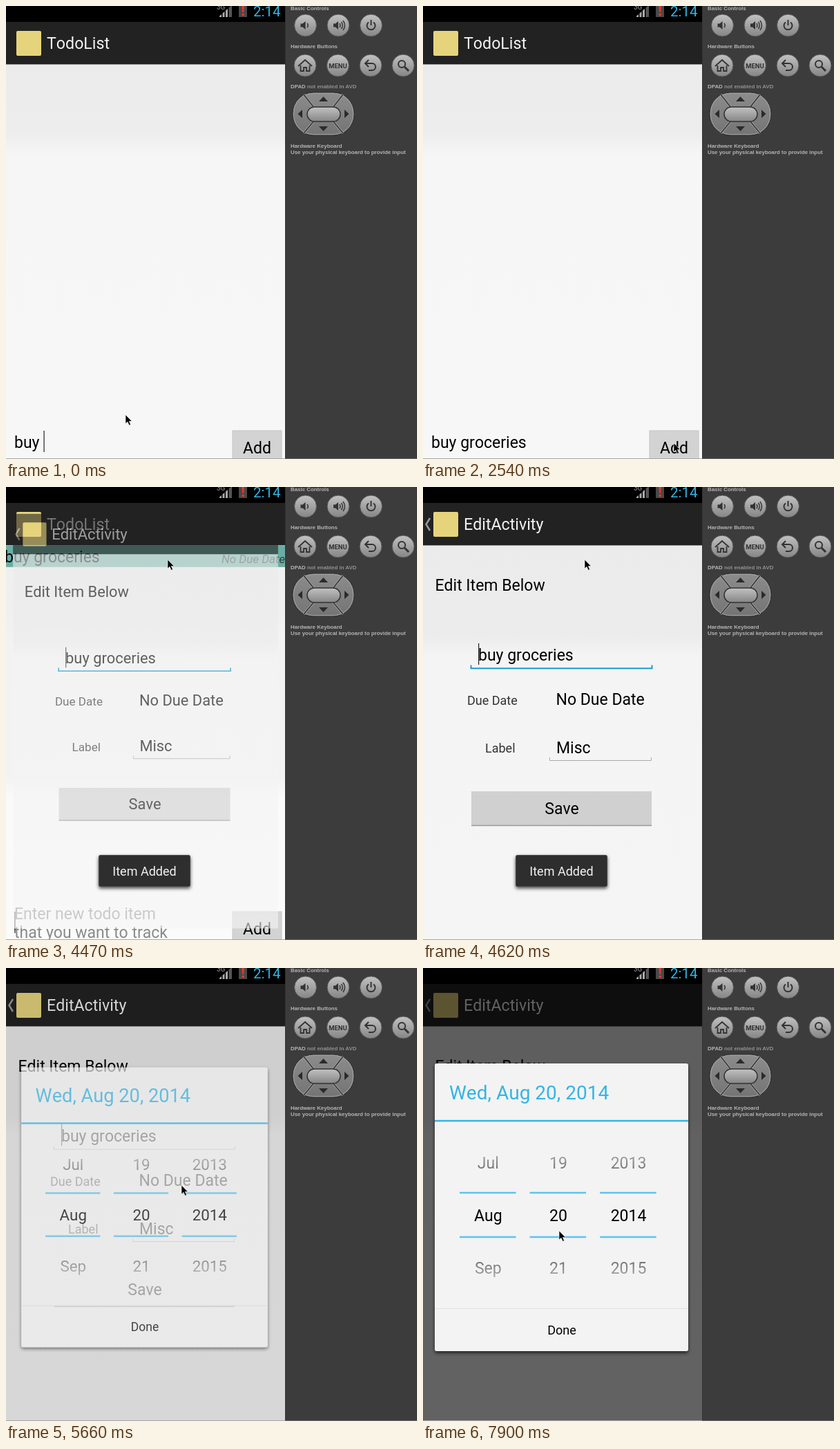
An HTML page for the animation above (8000 ms loop, 595 px wide and 655 px high).

```html
<!DOCTYPE html>
<html lang="en">
<head>
<meta charset="utf-8">
<title>Todo list demo</title>
<style>
  html, body { margin: 0; width: 100%; height: 100%; overflow: hidden; background: #3c3c3c; }
  svg { display: block; width: 595px; height: 655px; }
  text { font: 23px Roboto, sans-serif; font-kerning: none; white-space: pre; }
  .mid { text-anchor: middle; }
  .small { font-size: 18px; }
  .title { font-size: 23.2px; fill: #f3f3f3; }
  .note { font: bold 7.9px "Liberation Sans", Arial, sans-serif; fill: #b4b4b4; }
</style>
</head>
<body>
<svg viewBox="0 0 595 655">
  <defs>
    <linearGradient id="emptyBg" gradientUnits="userSpaceOnUse" x1="0" y1="84" x2="0" y2="654">
      <stop offset="0" stop-color="#ebebeb"/><stop offset=".175" stop-color="#ededed"/>
      <stop offset=".23" stop-color="#f6f6f6"/><stop offset="1" stop-color="#f7f7f7"/>
    </linearGradient>
    <linearGradient id="filledBg" gradientUnits="userSpaceOnUse" x1="0" y1="84" x2="0" y2="654">
      <stop offset="0" stop-color="#efefef"/><stop offset=".18" stop-color="#f0f0f0"/>
      <stop offset=".22" stop-color="#f2f2f2"/><stop offset=".59" stop-color="#f3f3f3"/>
      <stop offset=".64" stop-color="#fafafa"/><stop offset="1" stop-color="#fbfbfb"/>
    </linearGradient>
    <linearGradient id="editBg" gradientUnits="userSpaceOnUse" x1="0" y1="84" x2="0" y2="654">
      <stop offset="0" stop-color="#ebebeb"/><stop offset=".23" stop-color="#ececec"/>
      <stop offset=".28" stop-color="#f4f4f4"/><stop offset="1" stop-color="#f5f5f5"/>
    </linearGradient>
    <linearGradient id="knob" x1="0" y1="0" x2="0" y2="1">
      <stop offset="0" stop-color="#c2c2c2"/><stop offset="1" stop-color="#858585"/>
    </linearGradient>
    <linearGradient id="pad" x1="0" y1="0" x2="0" y2="1">
      <stop offset="0" stop-color="#8c8c8c"/><stop offset="1" stop-color="#747474"/>
    </linearGradient>
    <linearGradient id="upper" gradientUnits="userSpaceOnUse" x1="0" y1="270" x2="0" y2="294">
      <stop offset="0" stop-color="#a8a8a8"/><stop offset="1" stop-color="#6c6c6c"/>
    </linearGradient>
    <linearGradient id="lower" gradientUnits="userSpaceOnUse" x1="0" y1="422" x2="0" y2="446">
      <stop offset="0" stop-color="#6c6c6c"/><stop offset="1" stop-color="#a8a8a8"/>
    </linearGradient>
    <filter id="shadow" x="-10%" y="-20%" width="120%" height="150%">
      <feDropShadow dx="0" dy="2.500" stdDeviation="2.500" flood-opacity=".7"/>
    </filter>
    <clipPath id="screen"><rect width="404" height="654"/></clipPath>
    <g id="bar">
      <rect y="23" width="404" height="61.400" fill="#222"/>
      <rect x="15" y="36" width="36" height="36" rx="2" fill="#e6d47c"/>
    </g>
  </defs>

  <g clip-path="url(#screen)">
    <g id="list">
      <rect id="listBg" y="84" width="404" height="570"/>
      <use href="#bar"/>
      <text class="title" x="59" y="62">TodoList</text>
      <g id="item">
        <rect y="84" width="404" height="32" fill="#6bada4"/>
        <path d="M0 84.500H404M0 115.500H404" stroke="#85bdb5"/>
        <text x="-2" y="109">buy groceries</text>
        <text x="312" y="110" fill="#2c3c3a" style="font-size:17px;font-style:italic">No Due Date</text>
      </g>
      <text id="entry" x="12" y="639"></text>
      <g id="hint" fill="#8a8a8a">
        <text x="12" y="625">Enter new todo item</text>
        <text x="12" y="652">that you want to track</text>
      </g>
      <rect id="caret" y="614" width="1.200" height="31" fill="#222"/>
      <rect x="328" y="614" width="71" height="46" fill="#d3d3d3" stroke="#c6c6c6"/>
      <text class="mid" x="363.500" y="647">Add</text>
    </g>

    <g id="edit">
      <rect y="84" width="404" height="570" fill="url(#editBg)"/>
      <use href="#bar"/>
      <path d="M10 45L4.500 54L10 63" fill="none" stroke="#9a9a9a" stroke-width="2.500"/>
      <text class="title" x="59" y="62">EditActivity</text>
      <text x="17.500" y="150">Edit Item Below</text>
      <rect x="80" y="226" width="1.200" height="31" fill="#222"/>
      <text x="80" y="251">buy groceries</text>
      <path id="field" d="M69.500 257.500V262.200H331.500V257.500" fill="none"/>
      <text class="small" x="64" y="315" fill="#333">Due Date</text>
      <text x="192.500" y="315">No Due Date</text>
      <text class="small" x="90" y="384" fill="#333">Label</text>
      <text x="193" y="384.500">Misc</text>
      <path d="M183.500 391V395.500H330.500V391" fill="none" stroke="#aaa"/>
      <rect id="save" x="70" y="440" width="261" height="50" fill="#d0d0d0"/>
      <path d="M70 489.500H331" stroke="#999" stroke-width="1.500"/>
      <text class="mid" x="201" y="473">Save</text>
    </g>

    <g id="toast">
      <rect x="134.500" y="532.500" width="132" height="45" rx="2" fill="#2d2d2d" stroke="#484848" filter="url(#shadow)"/>
      <text class="small mid" x="200.500" y="562" fill="#f2f2f2">Item Added</text>
    </g>

    <rect id="dim" y="23" width="404" height="631"/>
    <g id="dialog">
      <rect x="17" y="138" width="367" height="416" rx="3" fill="#f3f3f3" filter="url(#shadow)"/>
      <text x="38" y="190" fill="#33b5e5" style="font-size:28px">Wed, Aug 20, 2014</text>
      <path d="M17 221H384" stroke="#33b5e5" stroke-width="2.600"/>
      <g id="wheels"></g>
      <path d="M17 492.500H384" stroke="#e1e1e1"/>
      <text class="small mid" x="201" y="530">Done</text>
    </g>
  </g>

  <rect width="404" height="23"/>
  <text x="305" y="5" fill="#999" style="font-size:10px">3G</text>
  <path d="M309 16V14.500L312 12V16zM313.500 16V10.500L316.500 8V16zM318 16V6.500L321 4V16z" fill="#aaa"/>
  <path d="M322.500 16V2.500L327 -1V16z" fill="#555"/>
  <rect x="337" y="-2" width="12" height="18" fill="#494949"/>
  <path d="M341.500 -1H344.800L344.200 9H342.100zM341.700 11H344.700V14H341.700z" fill="#f0352b"/>
  <text x="358" y="14.800" fill="#33b5e5" style="font-size:20.500px">2:14</text>

  <rect x="404" width="191" height="655" fill="#3c3c3c"/>
  <path d="M404.500 0V655" stroke="#343434"/>
  <path d="M0 654.500H404" stroke="#a6a6a6"/>
  <path d="M404 654.500H595" stroke="#666"/>
  <text class="note" x="412" y="6">Basic Controls</text>
  <text class="note" x="412" y="60.500">Hardware Buttons</text>
  <text class="note" x="412" y="118.500">DPAD <tspan fill="#919191">not enabled in AVD</tspan></text>
  <text class="note" x="412" y="204.500">Hardware Keyboard</text>
  <text class="note" x="412" y="214">Use your physical keyboard to provide input</text>
  <g id="knobs"></g>

  <g>
    <rect x="415" y="125" width="89" height="62" rx="30" fill="url(#pad)" stroke="#2c2c2c"/>
    <rect x="416.300" y="126.300" width="86.400" height="59.400" rx="29" fill="none" stroke="#a4a4a4"/>
    <path d="M431 128L446 147M488 128L473 147M431 184L446 166M488 184L473 166" stroke="#a4a4a4" stroke-width="3.500"/>
    <path d="M431 128L446 147M488 128L473 147M431 184L446 166M488 184L473 166" stroke="#3a3a3a" stroke-width="1.800"/>
    <rect x="436" y="146" width="48" height="21" rx="10.500" fill="url(#knob)" stroke="#333" stroke-width="1.500"/>
    <path d="M453 138L459.500 131L466 138zM453 174L459.500 181L466 174zM429 150L422.500 156L429 162zM490 150L496.500 156L490 162z" fill="#2b2b2b"/>
  </g>

  <path id="mouse" d="M0 0V13L3 10.300L5.300 15.300L7.500 14.300L5.300 9.500H9.300z" stroke="#fff" stroke-width=".6"/>
</svg>

<script>
  const LOOP = 8000;
  const $ = id => document.getElementById(id);
  const [listBg, item, entry, hint, caret, edit, field, save, toast, dim, dialog, mouse] =
    ['listBg', 'item', 'entry', 'hint', 'caret', 'edit', 'field', 'save', 'toast', 'dim', 'dialog', 'mouse'].map($);

  // Date picker columns
  const columns = [['Jul', 'Aug', 'Sep'], ['19', '20', '21'], ['2013', '2014', '2015']];
  const rowFill = ['url(#upper)', '#000', 'url(#lower)'];
  $('wheels').innerHTML = columns.map((rows, c) => {
    const x = 94.3 + c * 101.6;
    const labels = rows.map((s, r) =>
      `<text class="mid" x="${x}" y="${290 + r * 76}" fill="${rowFill[r]}">${s}</text>`).join('');
    return labels + `<path d="M${x - 41.3} 325h81.500m-81.500 64h81.500" stroke="#5cc3ee" stroke-width="2.500"/>`;
  }).join('');

  // Device buttons, icons drawn around their centre
  const speaker = 'M-7 -2.500H-4L0 -6V6L-4 2.500H-7z';
  const line = (d, w = 2) => `<path d="${d}" fill="none" stroke="#333" stroke-width="${w}"/>`;
  const solid = d => `<path d="${d}" fill="#333"/>`;
  const buttons = [
    [433.5, 28, solid(speaker) + line('M2.500 -3Q5 0 2.500 3', 1.5)],
    [481, 28, solid(speaker) + line('M2 -3Q4 0 2 3M4.500 -5Q8 0 4.500 5M7 -7Q12 0 7 7', 1.4)],
    [528.5, 28, line('M-3.500 -4.500A6 6 0 1 0 3.500 -4.500M0 -8V0')],
    [433, 86, line('M-10 1L0 -8L10 1M-6.500 0V8H-2V3H2V8H6.500V0', 1.8)],
    [480.5, 86, '<text class="mid" y="3.500" fill="#333" style="font-size:9.500px;font-weight:700">MENU</text>'],
    [528, 86, line('M-7 -3H2A5 5 0 0 1 2 7H-3M-3 -8L-8 -3L-3 2')],
    [575, 86, '<circle cx="-2" cy="-2" r="5" fill="none" stroke="#333" stroke-width="2"/>' + line('M2 2L8 8', 3)]
  ];
  $('knobs').innerHTML = buttons.map(([x, y, icon]) =>
    `<g transform="translate(${x} ${y})"><circle r="16" fill="url(#knob)" stroke="#555"/>${icon}</g>`).join('');

  // Rows are [start time, value...]; each holds until the next
  const typing = [[0, 4], [150, 5], [450, 7], [750, 8], [900, 9], [1350, 10], [1500, 11], [1650, 12], [1800, 13], [2840, 0]];
  const pointer = [
    [0, 173, 591], [2090, 288, 604], [2240, 312, 626], [2390, 342, 635], [2540, 363, 632],
    [3280, 360, 525], [3430, 350, 190], [3580, 272, 60], [3730, 242, 92], [3870, 234, 105],
    [4920, 238, 145], [5070, 246, 225], [5220, 252, 290], [5360, 254, 314],
    [5960, 250, 335], [6110, 235, 375], [6250, 213, 410], [6400, 200, 426],
    [6700, 188, 413], [6850, 212, 270], [7000, 224, 167],
    [7300, 223, 192], [7450, 221, 238], [7600, 216, 292], [7750, 206, 345], [7900, 197, 380]
  ];
  const toastAlpha = [[0, 0], [2990, .5], [3140, 1], [5070, .7], [5220, .35], [5360, 0]];
  const editPose = [[0, 0, 1], [4470, .6, .95], [4620, 1, 1]];
  const dialogPose = [[0, 0, 1], [5660, .68, .972], [5810, 1, 1]];
  const dimAlpha = [[0, 0], [5660, .12], [5810, .4], [5960, .6]];

  const at = (table, t) => table.findLast(row => row[0] <= t).slice(1);
  const show = (el, on) => { el.style.display = on ? '' : 'none'; };
  const fade = (el, a) => { show(el, a > 0); el.setAttribute('opacity', a); };
  function pose(el, [alpha, scale], cx, cy) {
    fade(el, alpha);
    el.setAttribute('transform', `translate(${cx} ${cy}) scale(${scale}) translate(${-cx} ${-cy})`);
  }

  function draw(t) {
    const added = t >= 2840;
    listBg.setAttribute('fill', added ? 'url(#filledBg)' : 'url(#emptyBg)');
    show(item, added);
    show(hint, added);
    entry.textContent = 'buy groceries'.slice(0, at(typing, t)[0]);
    show(caret, t < 2090 || added);
    caret.setAttribute('x', 12.3 + (added ? 0 : entry.getComputedTextLength()));

    pose(edit, at(editPose, t), 202, 340);
    const focused = t < 5660;
    field.setAttribute('stroke', focused ? '#1a9bd0' : '#aaa');
    field.setAttribute('stroke-width', focused ? 2 : 1);
    show(save, focused);
    fade(toast, at(toastAlpha, t)[0]);
    fade(dim, at(dimAlpha, t)[0]);
    pose(dialog, at(dialogPose, t), 200.5, 346);
    mouse.setAttribute('transform', `translate(${at(pointer, t)})`);
  }

  const start = performance.now();
  function tick() {
    draw((performance.now() - start) % LOOP);
    requestAnimationFrame(tick);
  }
  tick();
</script>
</body>
</html>
```
